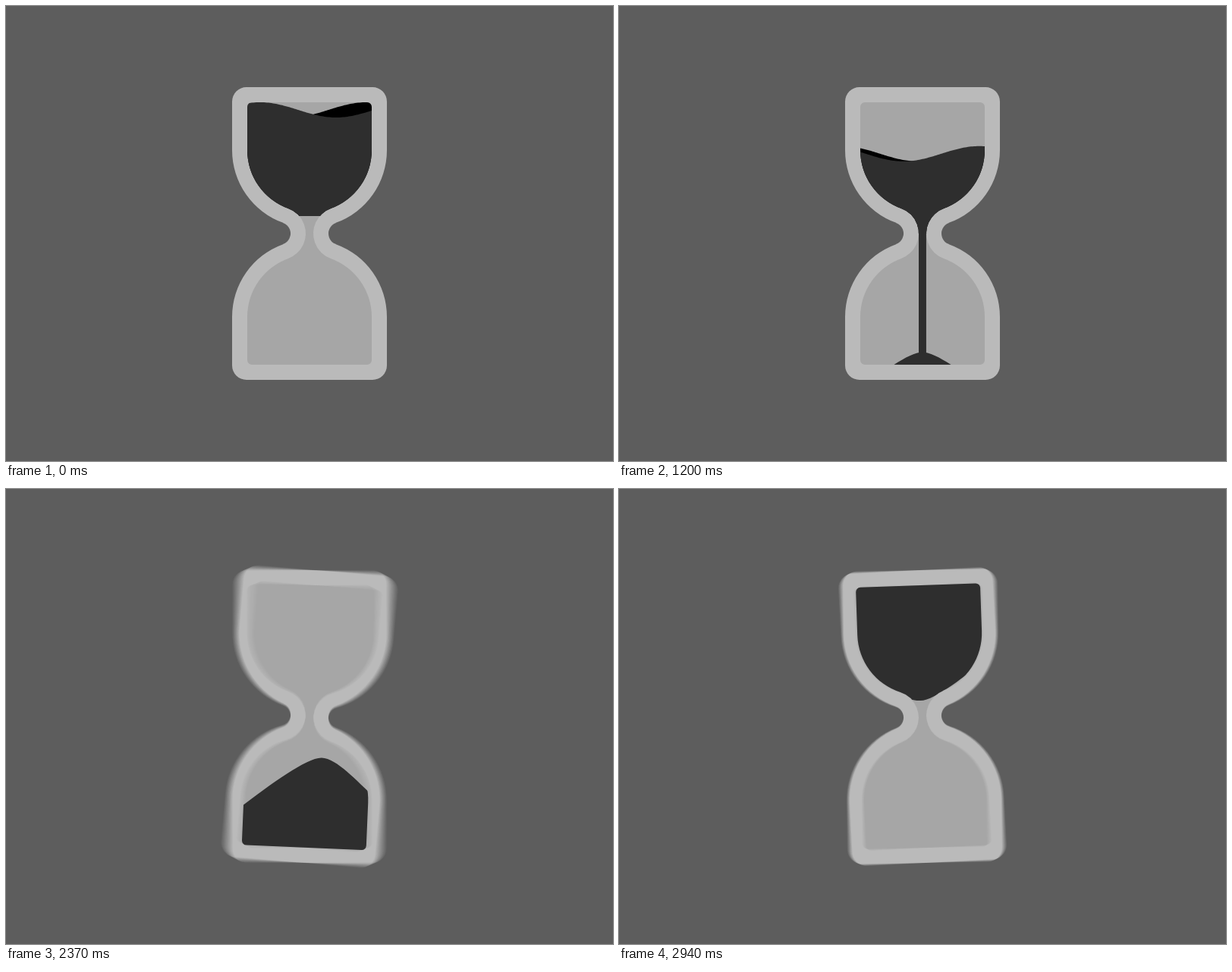
An HTML page with a canvas for the animation above (2970 ms loop, 800x600 px).

```html
<!DOCTYPE html>
<html>
<head>
<meta charset="utf-8">
<title>Hourglass</title>
<style>
html, body { margin: 0; width: 100%; height: 100%; overflow: hidden; background: #5d5d5d; }
canvas { display: block; }
</style>
</head>
<body>
<canvas id="stage" width="800" height="600"></canvas>
<script>
const LOOP = 2970, STEP = 30, PI = Math.PI;
const BG = '#5d5d5d', FRAME = '#bababa', GLASS = '#a6a6a6', SAND = '#2e2e2e', LINE = '#d2d2d2';

const ctx = document.getElementById('stage').getContext('2d');
const scratch = document.createElement('canvas');
scratch.width = 800;
scratch.height = 600;
const sctx = scratch.getContext('2d');

// Hourglass outline, pushed outward by d, with corner radius r
function outline(d, r) {
  const p = new Path2D(), a = Math.atan2(110, 40);
  const bowl = 92 + d, neck = 25 - d;
  const left = 308 - d, right = 492 + d, top = 117 - d, bottom = 483 + d;
  p.moveTo(400, top);
  p.arcTo(right, top, right, 190, r);
  p.arc(400, 190, bowl, 0, a);
  p.arc(440, 300, neck, a - PI, PI - a, true);
  p.arc(400, 410, bowl, -a, 0);
  p.arcTo(right, bottom, 400, bottom, r);
  p.arcTo(left, bottom, left, 410, r);
  p.arc(400, 410, bowl, PI, PI + a);
  p.arc(360, 300, neck, a, -a, true);
  p.arc(400, 190, bowl, PI - a, PI);
  p.arcTo(left, top, 400, top, r);
  p.closePath();
  return p;
}
const outer = outline(10, 19), inner = outline(-10, 6);

// time, angle, turn speed, sand: left y, peak x, peak y, right y, trail length, trail width
const KEYS = [
  [1080, 0, 0, 528, 400, 473, 528, 0, 0],
  [1950, 0, 0, 408, 400, 353, 408, 0, 0],
  [2250, 0, 0, 408, 400, 353, 408, 0, 0],
  [2550, 38, .38, 455, 446, 355, 395, 76, 2],
  [2700, 152.5, .38, 462, 458, 357, 395, 102, 13.5],
  [2790, 163, .11, 430, 440, 344, 390, 30, 8],
  [2940, 178, .067, 375, 402, 321, 360, 0, 0],
  [2970, 180, .06, 323, 400, 323, 323, 0, 0]
];

function pose(t) {
  t = Math.max(t, KEYS[0][0]);
  const i = Math.max(1, KEYS.findIndex(k => k[0] >= t));
  const a = KEYS[i - 1], b = KEYS[i], span = b[0] - a[0], u = (t - a[0]) / span;
  const v = a.map((x, n) => x + (b[n] - x) * u);
  const w = 1 - u;
  v[1] = a[1] * w * w * (1 + 2 * u) + b[1] * u * u * (3 - 2 * u)
    + span * u * w * (a[2] * w - b[2] * u);
  return v;
}

function turn(c, deg) {
  c.translate(400, 300);
  c.rotate(deg * PI / 180);
  c.translate(-400, -300);
}

function drawTrails(c, deg, length, width) {
  if (width < .1) return;
  for (const flip of [0, 180]) {
    const head = (deg - 90 + flip) * PI / 180, tail = head - length * PI / 180;
    const fade = c.createConicGradient(tail, 400, 300);
    fade.addColorStop(0, LINE + '00');
    fade.addColorStop(.03, LINE);
    c.strokeStyle = fade;
    for (const [r, k] of [[163, 1], [125, .85]]) {
      c.lineWidth = width * k;
      c.beginPath();
      c.arc(400, 300, r, tail, head);
      c.stroke();
    }
  }
}

// Averages several poses across the shutter time for motion blur
function drawGlass(deg, speed, length, width) {
  const spread = speed * 36, n = spread ? Math.min(16, 3 + Math.ceil(spread * 2)) : 1;
  for (let i = 0; i < n; i++) {
    sctx.fillStyle = BG;
    sctx.fillRect(0, 0, 800, 600);
    drawTrails(sctx, deg, length, width);
    sctx.save();
    turn(sctx, deg + spread * ((i + .5) / n - .5));
    sctx.fillStyle = FRAME;
    sctx.fill(outer);
    sctx.fillStyle = GLASS;
    sctx.fill(inner);
    sctx.restore();
    ctx.globalAlpha = 1 / (i + 1);
    ctx.drawImage(scratch, 0, 0);
  }
  ctx.globalAlpha = 1;
}

// Sand resting in the lower bulb
function drawPile(l, x, y, r) {
  const mixX = e => e + (x - e) * .34, mixY = e => e + (y - e) * .42;
  ctx.beginPath();
  ctx.moveTo(310, l);
  ctx.bezierCurveTo(mixX(310), mixY(l), x - 20, y, x, y);
  ctx.bezierCurveTo(x + 20, y, mixX(490), mixY(r), 490, r);
  ctx.lineTo(490, 490);
  ctx.lineTo(310, 490);
  ctx.fillStyle = SAND;
  ctx.fill();
}

function drawWave(crest, level, color) {
  ctx.beginPath();
  for (let x = 310; x <= 490; x += 2)
    ctx.lineTo(x, level - 10 * Math.cos((x - crest) * PI / 100));
  ctx.lineTo(490, 490);
  ctx.lineTo(310, 490);
  ctx.fillStyle = color;
  ctx.fill();
}

// Sand draining from the upper bulb, with the falling stream
function drawFlow(t) {
  const s = t / 1000, late = Math.max(0, t - 1470);
  const level = 137 + 20.6 * s ** 2 + 13.56 * s ** 4 + .0011 * late ** 2;
  const foot = t < 540 ? 277 + 28 * (t / 540) ** 2
    : Math.min(474, 305 + 169 * ((t - 540) / 540) ** 2.24);
  ctx.save();
  ctx.beginPath();
  ctx.rect(310, 100, 180, Math.min(foot, 300) - 100);
  if (foot > 300) ctx.rect(395, 300, 9.6, foot - 300);
  ctx.clip();
  drawWave(475 - .1989 * t + 4e-5 * t * t, level, '#000');
  drawWave(335 + .0854 * t + 2.6e-5 * t * t, level, SAND);
  ctx.restore();
}

function draw(t) {
  const [, deg, speed, l, x, y, r, length, width] = pose(t);
  drawGlass(deg, speed && Math.max(speed, .05), length, width);
  ctx.save();
  turn(ctx, deg);
  ctx.clip(inner);
  if (t < 1950) drawFlow(t);
  if (t > 1080) drawPile(l, x, y, r);
  ctx.restore();
}

function tick() {
  const t = performance.now() % LOOP;
  draw(Math.floor(t / STEP) * STEP);
  requestAnimationFrame(tick);
}
tick();
</script>
</body>
</html>
```
